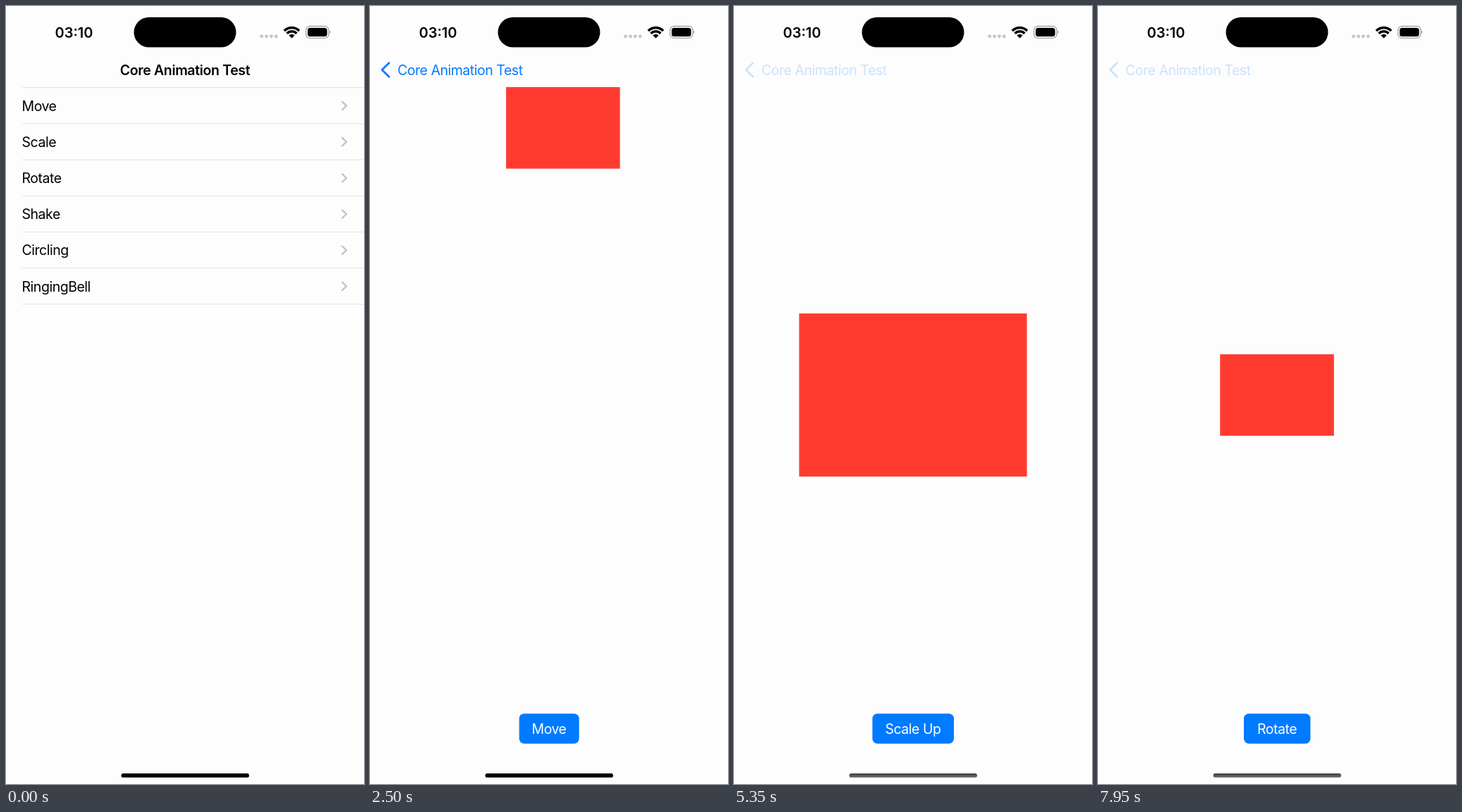
Write an HTML page that moves like this. It is 508x1103 px and loops after 8000 ms.

```html
<!DOCTYPE html>
<html lang="en">
<head>
<meta charset="utf-8">
<title>Core Animation Test</title>
<style>
  html, body { margin: 0; width: 100%; height: 100%; overflow: hidden; background: #fdfdfd; }
  svg { display: block; width: 100%; height: 100%; }
  text { font: 400 19.5px Inter, "Liberation Sans", sans-serif; letter-spacing: -.024em; }
  .bold { font-weight: 600; letter-spacing: -.018em; }
  .clock { font-size: 20px; letter-spacing: 0; }
  .mid { text-anchor: middle; }
  .line { stroke: #e2e2e4; stroke-width: 1; }
  .more { fill: none; stroke: #c3c3c5; stroke-width: 2.3; stroke-linecap: round; stroke-linejoin: round; }
  .wifi { fill: none; stroke: #000; stroke-width: 3.5; }
</style>
</head>
<body>
<svg viewBox="0 0 508 1103" preserveAspectRatio="none">
  <defs>
    <linearGradient id="grey" x2="0" y2="1">
      <stop stop-color="#404040"/>
      <stop offset="1" stop-color="#6c6c6c"/>
    </linearGradient>
  </defs>
  <rect width="508" height="1103" fill="#fdfdfd"/>

  <g id="list">
    <rect id="glow" y="116" width="508" height="51.2" fill="#d1d1d6"/>
  </g>
  <rect id="dim" width="508" height="1103"/>

  <g id="page">
    <rect id="box" width="161.6" height="115.6" fill="#ff3b30"/>
    <rect id="button" y="1003.3" height="42.4" rx="7" fill="#007aff"/>
    <text id="caption" class="mid" x="254" y="1032" fill="#fff"></text>
  </g>

  <text id="title" class="bold mid" x="254" y="97.5">Core Animation Test</text>
  <g id="back">
    <path d="M27 80.8 17 90.5 27 100.2" fill="none" stroke="#007aff" stroke-width="2.8"
          stroke-linecap="round" stroke-linejoin="round"/>
    <text id="label" x="39" y="97.5" fill="#007aff">Core Animation Test</text>
  </g>

  <text class="bold clock mid" x="96.5" y="45">03:10</text>
  <rect x="181.5" y="16" width="145" height="42.5" rx="21.25"/>
  <g fill-opacity=".22">
    <circle cx="362.7" cy="43" r="2.4"/><circle cx="369.6" cy="43" r="2.4"/>
    <circle cx="376.4" cy="43" r="2.4"/><circle cx="383.3" cy="43" r="2.4"/>
  </g>
  <g transform="translate(405.5 45.8)">
    <path class="wifi" d="M-10.6-10.6A15 15 0 0 1 10.6-10.6M-6.9-6.9A9.7 9.7 0 0 1 6.9-6.9"/>
    <path d="M0 0-4.2-4.2A6 6 0 0 1 4.2-4.2Z"/>
  </g>
  <rect x="425.7" y="28.7" width="32.3" height="16.8" rx="5.5" fill="none" stroke="#000"
        stroke-opacity=".4" stroke-width="1.2"/>
  <rect x="428" y="31" width="27.6" height="12.2" rx="3.5"/>
  <path d="M459.4 34.6Q461.6 37.1 459.4 39.6Z" fill-opacity=".45"/>
  <rect id="home" x="163.5" y="1088" width="181.5" height="5.8" rx="2.9"/>
</svg>

<script>
const LOOP = 8000, STEP = 50, PITCH = 51.2, WIDTH = 508;
const $ = id => document.getElementById(id);
const mix = (a, b, k) => a + (b - a) * k;
const clamp = v => Math.min(1, Math.max(0, v));

// Critically damped spring: stiffness 1000, mass 3
const spring = ms => {
  const y = Math.sqrt(1000 / 3) * Math.max(0, ms) / 1000;
  return 1 - (1 + y) * Math.exp(-y);
};

const centred = 'translate(173.2 493.7)';
const about = turn => `translate(254 551.5) ${turn} translate(-254 -551.5) ${centred}`;

const screens = [
  { row: 0, name: 'Move', width: 85, tap: 1000, push: 1230, shown: 1730,
    press: 1950, act: 2150, done: 2650, back: 3000, pop: 3082, end: 3440,
    pose: k => `translate(${mix(23, 266, k)} 115)` },
  { row: 1, name: 'Scale Up', width: 115.6, tap: 3440, push: 3440, shown: 3940,
    press: 4100, act: 4300, done: 4800, back: 5300, pop: 5360, end: 5750,
    pose: k => about(`scale(${1 + k})`) },
  { row: 2, name: 'Rotate', width: 94.5, tap: 5982, push: 5982, shown: 6482,
    press: 6650, act: 6850, done: 7850, back: 7950, pop: LOOP, end: LOOP,
    pose: k => about(`rotate(${360 * k})`) }
];

function buildList() {
  let html = '<path class="line" d="M23 115.6H508"/>';
  ['Move', 'Scale', 'Rotate', 'Shake', 'Circling', 'RingingBell'].forEach((name, i) => {
    const y = 141.4 + i * PITCH;
    html += `<text x="22.5" y="${y + 7.2}">${name}</text>
      <path class="more" d="M477 ${y - 5.7}l6 5.7-6 5.7"/>
      <path class="line" d="M23 ${115.6 + (i + 1) * PITCH}H508"/>`;
  });
  $('list').insertAdjacentHTML('beforeend', html);
}

const show = (id, on) => $(id).setAttribute('visibility', on ? 'visible' : 'hidden');
const fade = (id, v) => $(id).setAttribute('opacity', v);
const slide = (id, x) => $(id).setAttribute('transform', `translate(${x} 0)`);

function render(t) {
  const s = screens.find(s => t >= s.tap && t < s.end);
  const popping = s && t >= s.pop;
  let open = 0;
  if (s) open = popping ? 1 - spring(t - s.pop) : t >= s.shown ? 1 : spring(t - s.push);
  const arrived = Boolean(s) && t >= s.shown;
  const settled = arrived && !popping;

  show('list', !settled);
  show('dim', !settled);
  slide('list', -0.3 * WIDTH * open);
  fade('dim', 0.1 * open);
  fade('glow', !s ? 0 : popping ? open : 1);

  slide('title', -109 * open);
  fade('title', Math.pow(1 - open, 1.5));
  slide('label', (popping ? 100 : 134) * (1 - open));
  fade('back', open * (s && t >= s.back ? 0.2 : 1));

  const onPage = Boolean(s) && t >= s.push;
  $('page').style.display = onPage ? '' : 'none';
  if (s) {
    slide('page', WIDTH * (1 - open));
    $('glow').setAttribute('y', 115.8 + s.row * PITCH);
    $('button').setAttribute('x', 254.2 - s.width / 2);
    $('button').setAttribute('width', s.width);
    fade('button', t >= s.press && t < s.act ? 0.75 : 1);
    $('caption').textContent = s.name;
    $('box').setAttribute('transform', s.pose(clamp((t - s.act) / (s.done - s.act))));
  }
  show('box', arrived);
  $('home').setAttribute('fill', t >= screens[0].pop ? 'url(#grey)' : '#000');
}

buildList();
const start = performance.now();
function tick() {
  const t = (performance.now() - start) % LOOP;
  render(Math.floor(t / STEP) * STEP);
  requestAnimationFrame(tick);
}
tick();
</script>
</body>
</html>
```
